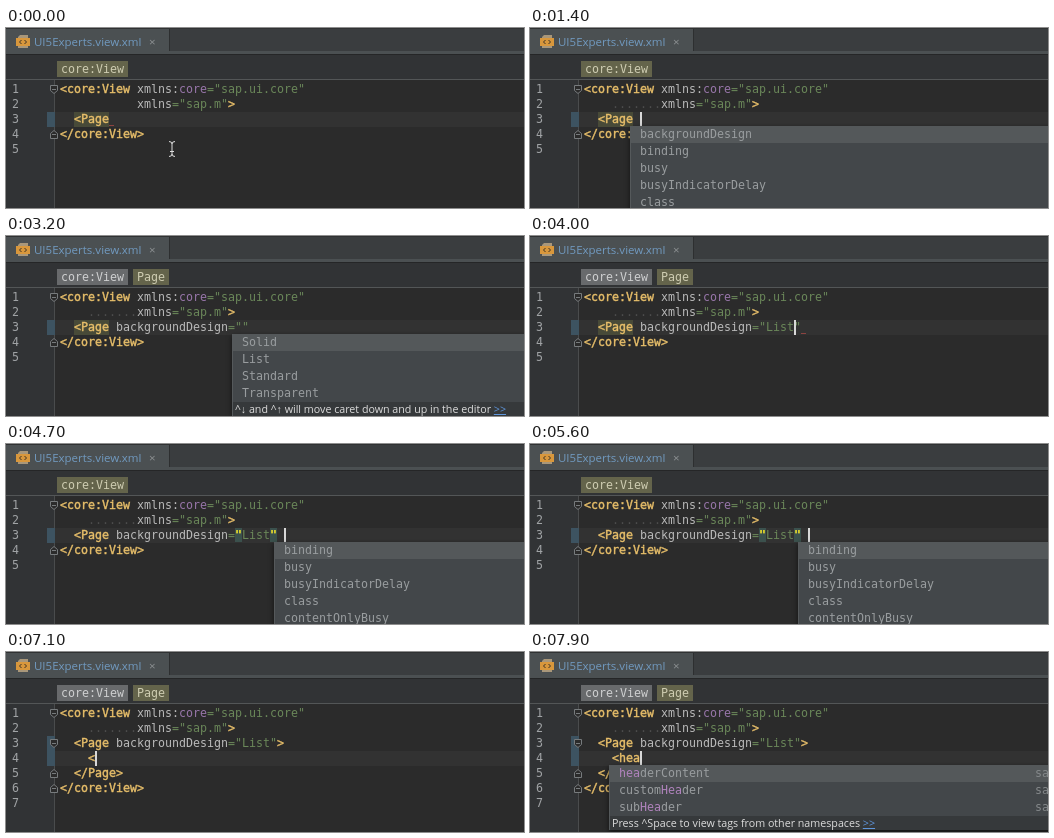
Recreate the animation shown at these times as an HTML page. Size 518x180 px, loop 8 s.

```html
<!DOCTYPE html>
<html lang="en">
<head>
<meta charset="utf-8">
<title>Code completion</title>
<style>
html, body { margin: 0; height: 100%; overflow: hidden; background: #2b2b2b; }
#stage { position: relative; width: 518px; height: 180px; overflow: hidden; background: #2b2b2b;
  font: 11.63px/15px "DejaVu Sans Mono", monospace; color: #bababa; }
#stage div, #stage svg { position: absolute; }
#view { left: 0; top: 0; width: 518px; height: 180px; white-space: pre; }
.bar { left: 0; top: 0; width: 518px; height: 27px; box-sizing: border-box; background: #3a3d3f;
  border-top: 1px solid #303233; border-bottom: 1px solid #252627; }
.tab { left: 0; top: 0; width: 163px; height: 23px; background: #4b5052; border-right: 1px solid #2d2f30;
  font: 11.5px/25px "Open Sans", sans-serif; color: #719ac0; }
.strip { left: 0; top: 22px; width: 518px; height: 3px; background: #4b5052; }
.name { left: 28px; top: 0; }
.close { left: 143px; top: 0; color: #8d9193; }
.gutter { left: 0; top: 51px; width: 48px; height: 129px; background: #313335; border-right: 1px solid #4a4c4d; }
.crumbs { left: 0; top: 27px; width: 518px; height: 24px; background: #313335; border-bottom: 1px solid #535657; }
.crumb { top: 33px; height: 16px; line-height: 16px; padding: 0 4px; background: #686a6c; color: #cfd0d1; }
.crumb.now { background: #64644b; color: #cfcdb2; }
.line { left: 54px; }
.num { left: 6px; color: #a0a3a5; }
.row { left: 49px; width: 469px; height: 15px; background: #323232; }
.mark { left: 41px; width: 8px; height: 15px; background: #3d5361; }
.t { color: #e8bf6a; -webkit-text-stroke: .4px #e8bf6a; }
.s { color: #6a8759; }
.p { color: #9876aa; }
.dots { color: #4c4c4c; }
.hl { background: #484a38; }
.q { background: #3b514d; color: #ffef28; font-weight: bold; }
.err { background: linear-gradient(#8c4340, #8c4340) 0 100% / 100% 1px no-repeat; }
.caret { width: 1.5px; height: 15px; background: #d8d8d8; }
.pop { width: 520px; background: #43474a; box-shadow: 0 2px 5px #0009; border-left: 1px solid #55595b; }
.pop div { left: 0; width: 520px; height: 17px; line-height: 17px; padding-left: 9px; color: #999d9f; }
.pop .sel { background: #54585a; }
.pop .hint { height: 14px; padding-left: 2px; background: #36393b; color: #dcdcdc;
  font: 10.7px/14px "Open Sans", sans-serif; }
.pop i { position: absolute; font-style: normal; color: #85898b; }
.pop b { font-weight: normal; color: #b083bd; }
.hint u { color: #5f96dc; }
</style>
</head>
<body>
<div id="stage">
  <div class="bar">
    <div class="tab">
      <svg style="left:10px;top:6px" width="14" height="13" fill="none">
        <path d="M4 0h8v13H2V2z" fill="#a9977a"/><rect y="3" width="14" height="8" fill="#d8973c"/>
        <path d="M5.500 5l-2 2 2 2M8.500 5l2 2-2 2" stroke="#3b3226"/>
      </svg>
      <div class="name">UI5Experts.view.xml</div><div class="close">×</div>
    </div>
    <div class="strip"></div>
  </div>
  <div class="gutter"></div>
  <div class="crumbs"></div>
  <div id="view"></div>
</div>
<script>
const LOOP = 8000, CH = 7, LEFT = 54, TOP = 54, ROW = 15;
const view = document.getElementById('view');

const attrs = ['backgroundDesign', 'binding', 'busy', 'busyIndicatorDelay', 'class', 'contentOnlyBusy'];
const designs = ['Solid', 'List', 'Standard', 'Transparent'];
const tags = ['content', 'customHeader', 'footer', 'headerContent', 'subHeader'];
const headers = ['headerContent', 'customHeader', 'subHeader'];
const dotHint = 'Press ^. to choose the selected (or first) suggestion and insert a dot afterwards';
const moveHint = '^↓ and ^↑ will move caret down and up in the editor <u>&gt;&gt;</u>';
const spaceHint = 'Press ^Space to view tags from other namespaces <u>&gt;&gt;</u>';

const attr = '<Page backgroundDesign=', done = attr + '"List"';
const attrPop = (items, match, hint) => ({ col: 8, items, match, hint });
const valuePop = sel => ({ col: 26, items: designs, sel, hint: moveHint });
const tagPop = (items, match, hint) => ({ col: 5, items, match, hint, side: 'sap.m' });

// Each step: start time, text of the edited line, options
const steps = [
  [0, '<Page', { hl: 5, err: 1, mouse: 1, nocaret: 1 }],
  [100, '<Page', { hl: 5, err: 1, mouse: 1, dots: 1 }],
  [500, '<Page', { hl: 5, err: 1, mouse: 1, nocaret: 1 }],
  [1000, '<Page', { hl: 5, err: 1, mouse: 1 }],
  [1400, '<Page ', { hl: 5, pop: attrPop(attrs) }],
  [1800, '<Page b', { hl: 5, pop: attrPop(attrs.slice(0, 4), 'b') }],
  [1900, '<Page ba', { hl: 5, pop: attrPop(attrs.slice(0, 1), 'ba', dotHint) }],
  [2200, attr + '""', { hl: 5, caret: -1 }],
  [2400, attr + '""', { hl: 5, caret: -1, pop: valuePop(0) }],
  [2700, attr + '""', { hl: 5, nocaret: 1, page: 1, pop: valuePop(0) }],
  [3500, attr + '""', { hl: 5, nocaret: 1, page: 1, pop: valuePop(1) }],
  [4000, done, { hl: 5, caret: -1, err: 1, page: 1 }],
  [4300, done, { hl: 5, quotes: 1, err: 1, page: 1 }],
  [4500, done + ' ', { quotes: 1 }],
  [4700, done + ' ', { quotes: 1, pop: { col: 32, items: attrs.slice(1) } }],
  [5900, done + '>', {}],
  [6000, done + '></Page>', { caret: -7 }],
  [6300, done + '></Page>', { caret: -7, hl: 99, page: 1 }],
  [7000, '', { split: 1, page: 1 }],
  [7100, '<', { split: 1, page: 1 }],
  [7200, '<', { split: 1, page: 1, pop: tagPop(tags) }],
  [7500, '<h', { split: 1, page: 1, pop: tagPop(tags, 'h') }],
  [7800, '<he', { split: 1, page: 1, pop: tagPop(headers, 'he', spaceHint) }],
  [7900, '<hea', { split: 1, page: 1, pop: tagPop(headers, 'hea', spaceHint) }]
];

const esc = s => s.replace(/&/g, '&amp;').replace(/</g, '&lt;').replace(/>/g, '&gt;');
const span = (cls, s) => `<span class="${cls}">${esc(s)}</span>`;
const box = (cls, style, html = '') => `<div class="${cls}" style="${style}">${html}</div>`;
const yOf = n => TOP + (n - 1) * ROW;
const xOf = col => LEFT + col * CH;

function paint(text, quotes) {
  return text.split(/(<\/?[\w:]*|>|=|"[^"]*"|:core)/).map(part => {
    if (/^[<>]/.test(part)) return span('t', part);
    if (part === ':core') return ':' + span('p', 'core');
    if (quotes && part[0] === '"') return span('q', '"') + span('s', part.slice(1, -1)) + span('q', '"');
    return /^[="]/.test(part) ? span('s', part) : esc(part);
  }).join('');
}

function fold(n, end) {
  const d = end ? 'M.5 3.500l3.500-3 3.500 3v5h-7z' : 'M.5.5h7v5l-3.500 3-3.500-3z';
  return `<svg style="left:44px;top:${yOf(n) + 3}px" width="8" height="9" fill="#2b2b2b" stroke="#777b7d">
    <path d="${d}"/><path d="M2 4.500h4"/></svg>`;
}

function popup({ col, items, sel = 0, match = '', hint, side }, line) {
  const left = xOf(col) - 10, h = items.length * 17;
  const note = side ? `<i style="left:${504 - left}px">${side}</i>` : '';
  const rows = items.map((item, i) => {
    const at = match ? item.toLowerCase().indexOf(match) : -1;
    const label = at < 0 ? item
      : item.slice(0, at) + `<b>${item.slice(at, at + match.length)}</b>` + item.slice(at + match.length);
    return box(i === sel ? 'sel' : '', `top:${i * 17}px`, label + note);
  });
  if (hint) rows.push(box('hint', `top:${h}px`, hint));
  return box('pop', `left:${left}px;top:${yOf(line + 1) - 1}px;height:${h + (hint ? 14 : 0)}px`, rows.join(''));
}

function draw([time, text, o]) {
  const cur = o.split ? 4 : 3, indent = o.split ? 4 : 2;
  const lines = ['<core:View xmlns:core="sap.ui.core"', ' '.repeat(11) + 'xmlns="sap.m">'];
  if (o.split) lines.push('  ' + done + '>');
  lines.push(' '.repeat(indent) + text);
  if (o.split) lines.push('  </Page>');
  lines.push('</core:View>', '');

  let html = box('row', `top:${yOf(cur)}px`);
  for (let n = 3; n <= cur; n++) html += box('mark', `top:${yOf(n)}px`);
  if (o.hl) html += box('hl', `left:${xOf(2)}px;top:${yOf(cur)}px;width:${Math.min(o.hl, text.length) * CH}px;height:15px`);
  if (o.err) html += box('err', `left:${xOf(indent + text.length)}px;top:${yOf(cur)}px;width:5px;height:14px`);
  if (time) html += box('dots', `left:${xOf(4)}px;top:${yOf(2)}px`, '.'.repeat(7));
  lines.forEach((s, i) => {
    html += box('num', `top:${yOf(i + 1)}px`, i + 1);
    html += box('line', `top:${yOf(i + 1)}px`, paint(s, o.quotes && i === cur - 1));
  });
  html += fold(1) + fold(lines.length - 1, true);
  if (o.split) html += fold(3) + fold(5, true);
  html += box('crumb' + (o.page ? '' : ' now'), 'left:51px', 'core:View');
  if (o.page) html += box('crumb now', 'left:127px', 'Page');
  if (!o.nocaret) html += box('caret', `left:${xOf(indent + text.length + (o.caret || 0))}px;top:${yOf(cur)}px`);
  if (o.mouse) html += `<svg style="left:161px;top:113px" width="10" height="16" fill="none" stroke="#ddd">
    <path d="M2 .5q3 0 3 2.500 0-2.500 3-2.500M5 3v10M2 15.500q3 0 3-2.500 0 2.500 3 2.500M3 10.500h4"/></svg>`;
  if (o.pop) html += popup(o.pop, cur);
  view.innerHTML = html;
}

let shown;
const start = performance.now();
function tick() {
  const t = (performance.now() - start) % LOOP;
  const step = steps.findLast(s => s[0] <= t);
  if (step !== shown) draw(shown = step);
  requestAnimationFrame(tick);
}
tick();
</script>
</body>
</html>
```
